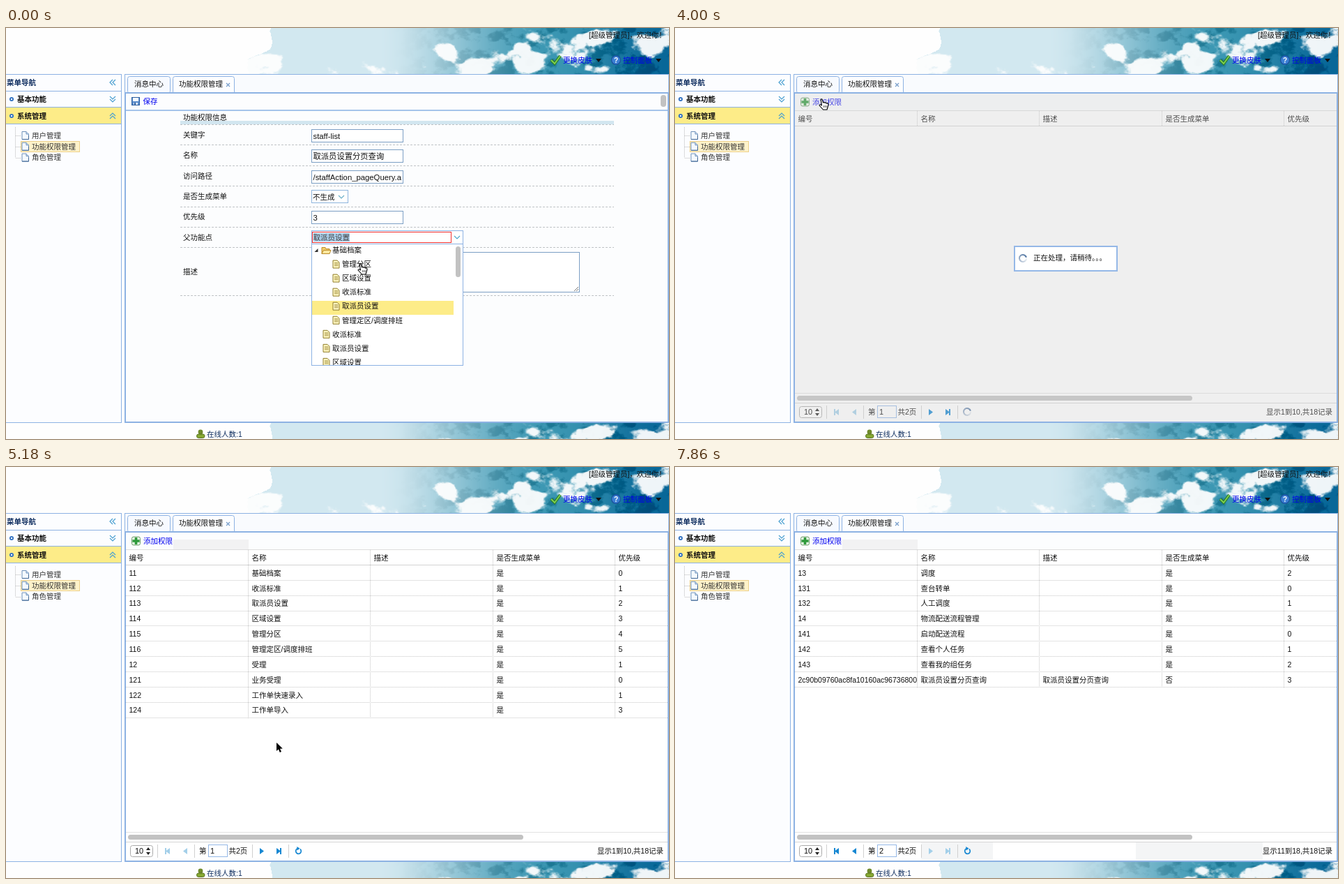
These frames come from a looping animation (951 by 589 pixels, 8.66 s). An HTML page with a canvas:

```html
<!DOCTYPE html>
<html lang="zh">
<head>
<meta charset="utf-8">
<style>
html, body { margin: 0; width: 100%; height: 100%; overflow: hidden; background: #fff; }
canvas { display: block; width: 951px; height: 589px; }
</style>
</head>
<body>
<canvas id="stage" width="951" height="589"></canvas>
<script>
const W = 951, H = 589, LOOP = 8660;
const BLUE = '#8db2e3', INK = '#111', LINK = '#0000f0';
const FONT = '"Liberation Sans", "Noto Sans CJK SC", "Noto Sans CJK", sans-serif';
let g = document.getElementById('stage').getContext('2d');

// Basic drawing helpers
function rect(x, y, w, h, color) { g.fillStyle = color; g.fillRect(x, y, w, h); }
function box(x, y, w, h, stroke, fill, width = 1) {
  if (fill) rect(x, y, w, h, fill);
  g.strokeStyle = stroke;
  g.lineWidth = width;
  g.strokeRect(x + width / 2, y + width / 2, w - width, h - width);
}
function round(x, y, w, h, r, fill, stroke) {
  g.beginPath();
  g.roundRect(x, y, w, h, r);
  if (fill) { g.fillStyle = fill; g.fill(); }
  if (stroke) { g.strokeStyle = stroke; g.lineWidth = 1; g.stroke(); }
}
function text(s, x, y, color = INK, size = 10.5, weight = '', align = 'left') {
  g.font = `${weight} ${size}px ${FONT}`;
  g.textAlign = align;
  g.fillStyle = color;
  g.fillText(s, x, y + size * 0.36);
}
function shape(d, x, y, fill, stroke, width = 1) {
  const p = new Path2D(d);
  g.save();
  g.translate(x, y);
  if (fill) { g.fillStyle = fill; g.fill(p); }
  if (stroke) { g.strokeStyle = stroke; g.lineWidth = width; g.stroke(p); }
  g.restore();
}
function disc(x, y, r, fill) {
  g.beginPath();
  g.arc(x, y, r, 0, 7);
  g.fillStyle = fill;
  g.fill();
}
function dashed(x1, y1, x2, y2, color, on, off) {
  g.setLineDash([on, off]);
  g.beginPath();
  g.moveTo(x1, y1);
  g.lineTo(x2, y2);
  g.strokeStyle = color;
  g.lineWidth = 1;
  g.stroke();
  g.setLineDash([]);
}
function clipped(x, y, w, h, paint) {
  g.save();
  g.beginPath();
  g.rect(x, y, w, h);
  g.clip();
  paint();
  g.restore();
}

// Cloudy sky made of value noise
const clamp = v => Math.max(0, Math.min(1, v));
const smooth = (a, b, v) => { v = clamp((v - a) / (b - a)); return v * v * (3 - 2 * v); };
const mix = (a, b, k) => a + (b - a) * k;
function hash(x, y) { const v = Math.sin(x * 127.1 + y * 311.7) * 43758.5453; return v - Math.floor(v); }
function noise(x, y) {
  const i = Math.floor(x), j = Math.floor(y), u = smooth(0, 1, x - i), v = smooth(0, 1, y - j);
  return mix(mix(hash(i, j), hash(i + 1, j), u), mix(hash(i, j + 1), hash(i + 1, j + 1), u), v);
}
function fbm(x, y) {
  let sum = 0, amp = 0.5;
  for (let k = 0; k < 5; k++, amp /= 2, x *= 2.03, y *= 2.03) sum += amp * noise(x, y);
  return sum;
}
const CLOUDS = [[378, 50, 36, 19], [545, 64, 60, 18], [665, 55, 62, 22], [745, 34, 34, 22], [838, 18, 40, 24], [925, 16, 30, 12]];
function skyColor(x) {
  const teal = smooth(530, 790, x), deep = smooth(780, 951, x);
  return [mix(mix(210, 58, teal), 8, deep), mix(mix(232, 150, teal), 103, deep), mix(mix(240, 178, teal), 152, deep)];
}
function makeSky() {
  const canvas = document.createElement('canvas');
  canvas.width = W; canvas.height = 66;
  const ctx = canvas.getContext('2d'), img = ctx.createImageData(W, 66);
  for (let x = 0; x < W; x++) {
    const base = skyColor(x), depth = smooth(540, 740, x);
    for (let y = 0; y < 66; y++) {
      const n = fbm(x / 42 + 9, y / 30 + 4), fine = fbm(x / 16, y / 12 + 40);
      let cover = n + 0.18 * (fine - 0.5) - 0.66;
      for (const [cx, cy, rx, ry] of CLOUDS)
        cover += 0.32 * Math.exp(-(((x - cx) / rx) ** 2) - ((y - cy) / ry) ** 2);
      const edge = 380 - 34 * smooth(28, 46, y) + 10 * (fine - 0.5);
      const white = x < edge ? 1 : smooth(-0.02, 0.09, cover) * 0.94;
      const shade = depth * smooth(0.52, 0.32, fine) * 30;
      const o = (y * W + x) * 4;
      base.forEach((c, k) => { img.data[o + k] = mix(c - shade, 254, white); });
      img.data[o + 3] = 255;
    }
  }
  ctx.putImageData(img, 0, 0);
  return canvas;
}

// Icons
function chevron(x, y, turn, color = '#4a9fd0') {
  g.save();
  g.translate(x, y);
  g.rotate(turn * Math.PI / 2);
  shape('M-4-2L0 2L4-2', 0, 0, null, color, 1.2);
  g.restore();
}
function page(x, y) {
  shape('M0-5.5H6L9.5-2V5.5H0Z', x, y, '#f4f9ff', '#6f91b8');
  shape('M6-5.5V-2H9.5', x, y, '#c9dcf2', '#6f91b8');
  shape('M0 5.5H9.5V0', x, y, null, '#3f6694');
}
function note(x, y) {
  shape('M0-5.5H6L9-2.5V5.5H0Z', x, y, '#fff6c0', '#8f7d2c');
  shape('M2-2H7.5M2 0H7.5M2 2H7.5', x, y, null, '#8f7d2c', 0.8);
}
function folder(x, y) {
  shape('M0 5V-4H5L6-2H11V5Z', x, y, '#f3cf6b', '#b98a2a');
  shape('M0 5L2.5 0H13L11 5Z', x, y, '#ffe9a0', '#b98a2a');
}
function down(x, y) { shape('M-4-2H4L0 3Z', x, y, '#111'); }
function plus(x, y) {
  round(x - 6, y - 6, 12, 12, 2.5, '#e9f7e6', '#6f9d6f');
  rect(x - 1.8, y - 5, 3.6, 10, '#2f9a3c');
  rect(x - 5, y - 1.8, 10, 3.6, '#2f9a3c');
}
function disk(x, y) {
  box(x, y, 12, 12, '#2e5f9e', '#5b8dcc');
  rect(x + 2, y + 1, 8, 5, '#f5f9ff');
  rect(x + 3, y + 8, 6, 3, '#e4edf8');
  rect(x + 4, y + 8, 2, 3, '#2e5f9e');
}
function spinner(x, y, r, angle) {
  for (let k = 0; k < 12; k++) {
    g.beginPath();
    g.arc(x, y, r, angle + k * 0.5, angle + k * 0.5 + 0.55);
    g.strokeStyle = `rgba(60,100,150,${0.12 + k * 0.07})`;
    g.lineWidth = 2;
    g.stroke();
  }
}

const sky = makeSky();

function drawShell() {
  rect(0, 0, W, H, '#fcfdfe');
  g.drawImage(sky, 0, 0);
  g.drawImage(sky, 0, 0, W, 23, 0, 566, W, 23);
  text('[超级管理员]，欢迎你！', 836, 10);
  shape('M-6 0L-1 5L7-6', 788, 46, null, '#2c7a1f', 4);
  shape('M-6 0L-1 5L7-6', 788, 46, null, '#7ccf52', 2);
  text('更换皮肤', 799, 46, LINK);
  down(850, 46);
  disc(875, 46, 7, '#1c4f9c');
  disc(875, 46, 5.8, '#3b7fd4');
  text('?', 875, 46, '#fff', 10, 'bold', 'center');
  text('控制面板', 885, 46, LINK);
  down(936, 46);

  // Navigation
  box(-1, 66, 167, 500, BLUE, '#fcfdff');
  rect(0, 114, 165, 23, '#fdec88');
  for (const y of [90, 113, 137]) rect(0, y, 165, 1, BLUE);
  text('菜单导航', 1, 78, '#0e2d5f', 10.5, 'bold');
  ['基本功能', '系统管理'].forEach((label, i) => {
    const y = 102 + i * 24;
    disc(8, y, 3, '#2e6fc0');
    disc(8, y, 1.2, '#fff');
    text(label, 16, y, '#111', 10.5, 'bold');
  });
  for (const d of [-2, 2]) {
    chevron(153 + d, 78, 1);
    chevron(153, 102 + d, 0);
    chevron(153, 126 + d, 2);
  }
  dashed(13.5, 142, 13.5, 186, '#bbb', 1, 1);
  box(21, 162, 85, 16, '#ecd08b', '#fef2ca');
  ['用户管理', '功能权限管理', '角色管理'].forEach((label, i) => {
    const y = 154 + i * 15.8, mid = Math.round(y) + 0.5;
    dashed(14, mid, 21, mid, '#bbb', 1, 1);
    page(23, y);
    text(label, 37, y, '#333');
  });

  // Tabs and main panel
  box(170, 66, 781, 500, BLUE, '#fcfdff');
  rect(171, 67, 779, 26, '#f9fbfe');
  round(174.5, 69.5, 61, 24, 3, '#f7faff', BLUE);
  round(239.5, 69.5, 88, 26, 3, '#fcfdff', BLUE);
  text('消息中心', 184, 80);
  text('功能权限管理', 248, 80);
  shape('M-2.5-2.5L2.5 2.5M2.5-2.5L-2.5 2.5', 318.5, 81.5, null, '#7aa0cc', 1.3);
  box(170, 92, 781, 474, BLUE, null, 2);

  // Status bar
  disc(279, 579, 3.4, '#6f8a2c');
  round(273.5, 582, 11.5, 5.5, 3, '#86a832', '#566f1e');
  text('在线人数:1', 288, 582, '#0e2d5f');
}

const shell = document.createElement('canvas');
shell.width = W; shell.height = H;
const screen2d = g;
g = shell.getContext('2d');
drawShell();
g = screen2d;

function field(y, value) {
  box(438, y, 132, 19, '#7c9fc4', '#fff');
  text(value, 440.5, y + 9.5, INK, 11.3);
}

function drawForm(t) {
  rect(172, 94, 777, 470, '#fcfdfe');
  disk(180, 99);
  text('保存', 196.5, 105, LINK);
  rect(172, 117, 777, 2, '#a5c4ea');
  round(939, 96, 8, 17, 4, '#c2c2c2');
  rect(250, 133, 622, 5, '#d2e6f0');
  if (t >= 2810) {
    rect(250, 126, 193, 11, '#e3ecfc');
    rect(223, 103, 45, 14, '#f4f4f5');
  }
  text('功能权限信息', 254, 128);
  for (let i = 0; i < 8; i++) {
    const y = i < 7 ? Math.round(138 + i * 29.4) + 0.5 : 383.5;
    dashed(250, y, 872, y, '#bfc3c6', 3, 2);
  }
  ['关键字', '名称', '访问路径', '是否生成菜单', '优先级', '父功能点', '描述']
    .forEach((label, i) => text(label, 254, i < 6 ? 153 + i * 29.4 : 349));
  field(145, 'staff-list');
  field(174, '取派员设置分页查询');
  field(204, '/staffAction_pageQuery.a');
  field(262, '3');
  box(438, 232, 53, 19, '#8fb6de', '#fff');
  text('不生成', 440, 242);
  chevron(481, 242, 0, '#6aaec8');

  box(438, 321, 385, 58, '#7c9fc4', '#fff');
  text('取派员设置分页查询', 440.5, 332, INK, 11.3);
  shape('M0 6L6 0M3 6L6 3', 815, 371, null, '#777');

  box(438, 290, 218, 20, BLUE, '#fff');
  if (t < 1630) {
    box(439, 292, 200, 16, '#f03030', '#fff');
    rect(441, 294, 52, 12, '#a9cbe6');
  } else rect(439, 291, 200, 18, '#e6e6e6');
  text('取派员设置', 440.5, 300, '#444');
  chevron(647, 300, 0, '#4fa9cc');
}

const OPTIONS = ['基础档案', '管理分区', '区域设置', '收派标准', '取派员设置', '管理定区/调度排班', '收派标准', '取派员设置', '区域设置'];
function drawDropdown(t, cursor) {
  const pitch = 20.05;
  box(438, 309, 218, 175, BLUE, '#fff');
  clipped(439, 310, 216, 173, () => {
    const hover = Math.floor((cursor.y + 2 - 310.5) / pitch);
    if (t >= 150 && t < 730) rect(439, 310.5 + hover * pitch, 203, 20, '#eaf2ff');
    rect(439, 391, 203, 20, '#fdec88');
    OPTIONS.forEach((label, i) => {
      const y = 318.5 + i * pitch, nested = i > 0 && i < 6;
      if (i) note(nested ? 469 : 455, y); else folder(453, y);
      text(label, nested ? 482 : 468, y);
    });
    shape('M5 0V5H0Z', 442.5, 316, '#333');
  });
  round(645, 313, 7, 44, 3.5, '#c2c2c2');
}

const ROW = 21.85, TOP = 141;
const FIRST = ['11 基础档案 0', '112 收派标准 1', '113 取派员设置 2', '114 区域设置 3', '115 管理分区 4',
  '116 管理定区/调度排班 5', '12 受理 1', '121 业务受理 0', '122 工作单快速录入 1', '124 工作单导入 3'];
const SECOND = ['13 调度 2', '131 查台转单 0', '132 人工调度 1', '14 物流配送流程管理 3', '141 启动配送流程 0',
  '142 查看个人任务 1', '143 查看我的组任务 2', '2c90b09760ac8fa10160ac9673680000 取派员设置分页查询 3 取派员设置分页查询 否'];
const columnX = i => Math.round(172.3 + i * 175.4);

function cells(values, y) {
  values.forEach((value, i) => clipped(columnX(i), y - 10, 175, 20, () => text(value, columnX(i) + 4.5, y)));
}

function arrowIcon(x, dir, bar, on) {
  const color = on ? '#1687d2' : '#a3cfe9';
  shape(dir > 0 ? 'M-3-4.5L3 0L-3 4.5Z' : 'M3-4.5L-3 0L3 4.5Z', x, 550.5, color);
  if (bar) rect(x + 3 * dir - 1, 546, 2, 9, color);
}

function drawPager(t, second, loading) {
  rect(172, 537, 777, 1, '#d6d6d6');
  if (t >= 5480) rect(353, 538, second ? 103 : 72, 25, '#f4f5f6');
  if (t >= 7110) rect(661, 538, 182, 25, '#f4f5f6');
  round(178.5, 542.5, 32, 16, 3, '#fff', '#aaa');
  text('10', 185, 550, INK, 11);
  shape('M-3-1.5H3L0-5.5ZM-3 1.5H3L0 5.5Z', 204, 550.5, '#222');
  for (const x of [217, 270, 353, 405]) rect(x, 541, 1, 19, '#d0d0d0');
  arrowIcon(232, -1, true, second);
  arrowIcon(257, -1, false, second);
  arrowIcon(367, 1, false, !second);
  arrowIcon(391, 1, true, !second);
  text('第', 277, 550);
  box(290, 541, 28, 18, '#95b8e7', '#fff');
  text(second ? '2' : '1', 293, 550, INK, 11);
  text('共2页', 319.5, 550);
  if (loading) spinner(419, 550, 5, t < 4300 ? 0 : 2);
  else {
    g.beginPath();
    g.arc(419.5, 550.5, 3.8, -0.9, 4.4);
    g.strokeStyle = '#1687d2';
    g.lineWidth = 1.7;
    g.stroke();
    shape('M0 0L4.5 2.5L1 5.5Z', 417, 544, '#1687d2');
  }
  text(second ? '显示11到18,共18记录' : '显示1到10,共18记录', 943, 550, INK, 10.5, '', 'right');
}

function drawTable(t, cursor) {
  const loading = t < 4440, second = t >= 6670;
  const rows = t < 4300 ? [] : second ? SECOND : FIRST;
  rect(172, 94, 777, 470, '#fff');
  rect(172, 94, 777, 25, '#fcfdfe');
  if (!loading) rect(240, 104, 108, 14, '#f2f2f3');
  plus(186.5, 106);
  text('添加权限', 197, 106, LINK);
  rect(172, 118, 777, 1, '#ddd');
  rect(172, 140, 777, 1, '#d4d4d4');
  cells(['编号', '名称', '描述', '是否生成菜单', '优先级'], 130);
  const hover = Math.floor((cursor.y - TOP) / ROW);
  if (!loading && hover >= 0 && hover < rows.length) rect(172, Math.round(TOP + hover * ROW), 777, 22, '#e8f1fd');
  rows.forEach((row, i) => {
    const [id, name, rank, info = '', menu = '是'] = row.split(' ');
    cells([id, name, info, menu, rank], 152 + i * ROW);
    const y = Math.round(TOP + (i + 1) * ROW) - 0.5;
    dashed(172, y, 949, y, '#c8c8c8', 1, 1);
  });
  const bottom = TOP + rows.length * ROW;
  for (let i = 1; i < 5; i++) dashed(columnX(i) - 0.5, 119, columnX(i) - 0.5, bottom, '#c4c4c4', 1, 1);
  rect(172, 523, 777, 1, '#e2e2e2');
  round(175, 527, 567, 7, 3.5, '#c2c2c2');
  drawPager(t, second, loading);
  box(170, 92, 781, 474, BLUE, null, 2);
  if (loading) {
    rect(172, 94, 777, 470, 'rgba(204,204,204,.32)');
    box(486, 312, 149, 37, '#95b8e7', '#fff', 2);
    spinner(499, 330, 5, t < 4300 ? 0 : 2);
    text('正在处理，请稍待。。。', 514, 329);
  }
}

// Pointer waypoints: step, x, y; the pointer moves in discrete steps between them
const STEP = 148.2;
const WAY = [
  [0, 507, 338], [1, 507, 342], [5, 520, 398], [16, 520, 398], [18, 425, 270], [20, 262, 120], [21, 225, 106],
  [23, 204, 99], [24, 204, 99], [25, 206, 99], [26, 206, 99], [27, 209, 102], [29, 209, 102], [31, 248, 122],
  [33, 394, 245], [34, 410, 325], [36, 366, 464], [38, 352, 529], [42, 365, 547], [45, 365, 547],
  [46, 385, 545], [48, 560, 522], [49, 670, 515], [52, 839, 587], [53, 999, 650]];
function pointerAt(t) {
  const step = Math.min(53, Math.floor((t + 13) / STEP));
  const i = Math.max(1, WAY.findIndex(w => w[0] >= step));
  const [s0, x0, y0] = WAY[i - 1], [s1, x1, y1] = WAY[i], k = (step - s0) / (s1 - s0);
  const hand = t < 1920 || (t >= 3410 && t < 4590) || (t >= 6070 && t < 6670);
  return { x: Math.round(mix(x0, x1, k)), y: Math.round(mix(y0, y1, k)), hand };
}
function drawPointer({ x, y, hand }) {
  g.lineJoin = 'round';
  if (hand) {
    shape('M0 0H2L3.5 5Q5 3.6 6.2 5.4Q7.6 4 8.6 6.2Q11 5 11 8L9 15H3.5L-2 9Q-1 6.5 1.5 9Z', x, y, '#fff', '#000', 1.1);
    shape('M4.4 9V12M6.4 9V12M8.3 9V12', x, y, null, '#222', 0.7);
  } else {
    const arrow = 'M0 0V12L2.8 9.5L4.8 14L7 13L5 8.8L8.8 8.6Z';
    shape(arrow, x, y, null, '#fff', 2);
    shape(arrow, x, y, '#000');
  }
  g.lineJoin = 'miter';
}

function draw(t) {
  const cursor = pointerAt(t);
  g.drawImage(shell, 0, 0);
  if (t < 4000) {
    drawForm(t);
    if (t < 1920) drawDropdown(t, cursor);
  } else drawTable(t, cursor);
  drawPointer(cursor);
}

const start = performance.now();
function tick() {
  draw((performance.now() - start) % LOOP);
  requestAnimationFrame(tick);
}
tick();
</script>
</body>
</html>
```
